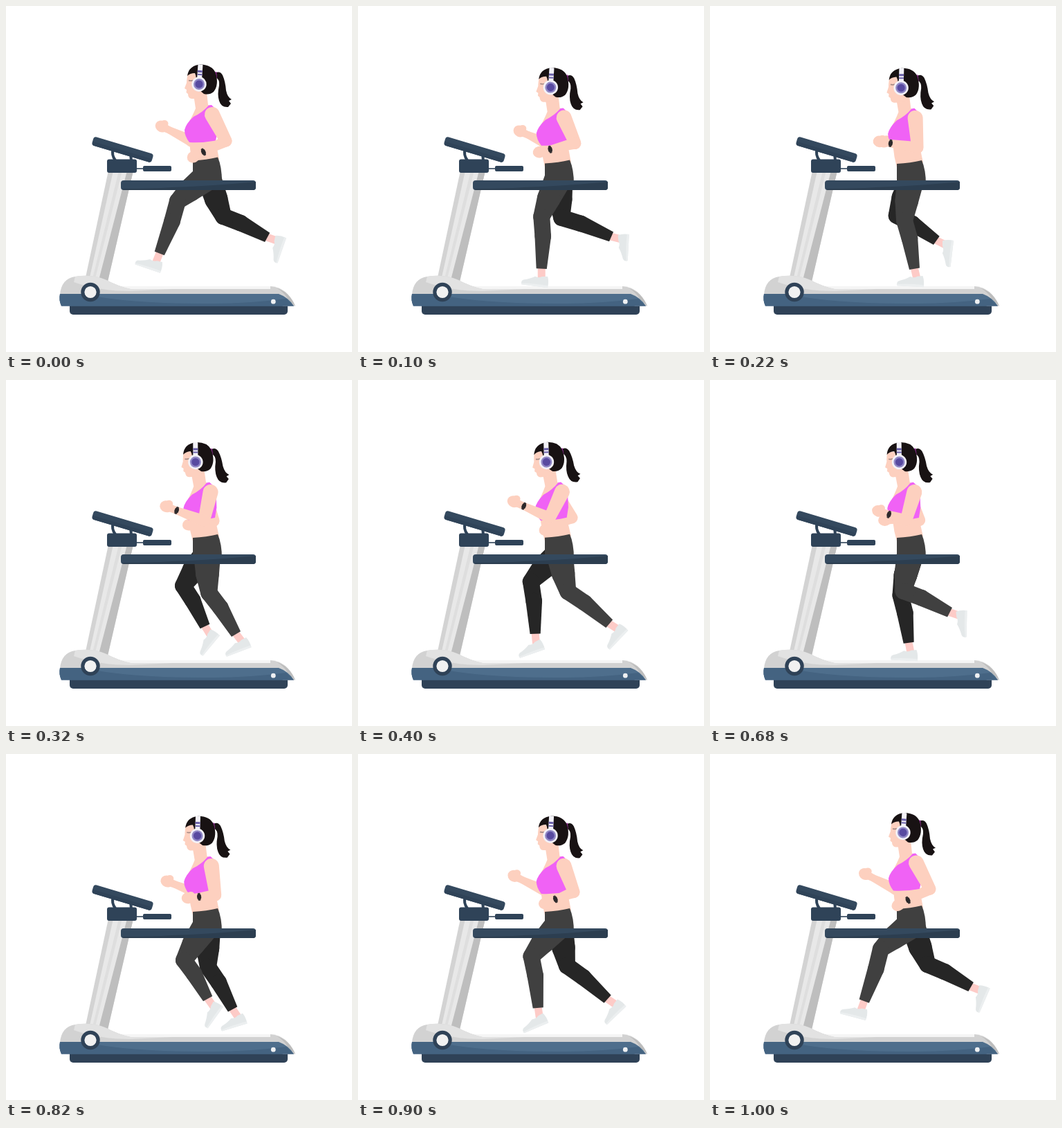
Recreate the animation shown at these times as an HTML page with a canvas. Size 500 by 500 pixels, loop 1020 ms.

```html
<!DOCTYPE html>
<html lang="en">
<head>
<meta charset="utf-8">
<title>Treadmill run</title>
<style>
html, body { margin: 0; width: 100%; height: 100%; overflow: hidden; background: #fff; }
canvas { display: block; width: 500px; height: 500px; }
</style>
</head>
<body>
<canvas id="stage" width="500" height="500"></canvas>
<script>
const ctx = document.getElementById('stage').getContext('2d');
const LOOP = 1020, STEP = 20, TAU = 2 * Math.PI, RAD = Math.PI / 180;
const SKIN = '#fdd0bf', ANKLE = '#fdcbc7', PINK = '#f062f5', HAIR = '#181213';
const NAVY = '#2f4358', SLATE = '#34495e', SHOE = '#e4e8e9';
const NEAR = '#404040', FAR = '#262626';
const FLOOR = 379; // lowest trouser end while the sole is on the belt

// One stride in evenly spaced poses: knee x y, trouser end x y.
const stride = [
  [248, 282, 222, 357],
  [270, 309, 277, 388],
  [285, 309, 304, 377],
  [301, 306, 358, 355],
  [314, 304, 377, 334],
  [288, 306, 359, 334],
  [264, 301, 313, 342],
  [251, 293, 263, 366]
];

// Closed Catmull-Rom curve through the poses; phase runs from 0 to 1.
function pose(phase) {
  const n = stride.length, i = Math.floor(phase * n), u = phase * n - i;
  const [a, b, c, d] = [-1, 0, 1, 2].map(k => stride[(i + k + n) % n]);
  return b.map((p, k) => p + u / 2 * (c[k] - a[k]
    + u * (2 * a[k] - 5 * p + 4 * c[k] - d[k] + u * (3 * (p - c[k]) + d[k] - a[k]))));
}

function fill(color, d) {
  ctx.fillStyle = color;
  ctx.fill(new Path2D(d));
}
function disc(color, x, y, rx, ry = rx, turn = 0) {
  ctx.fillStyle = color;
  ctx.beginPath();
  ctx.ellipse(x, y, rx, ry, turn, 0, TAU);
  ctx.fill();
}
function box(color, x, y, w, h, r) {
  ctx.fillStyle = color;
  ctx.beginPath();
  ctx.roundRect(x, y, w, h, r);
  ctx.fill();
}
function stroke(color, width, d) {
  ctx.strokeStyle = color;
  ctx.lineWidth = width;
  ctx.stroke(new Path2D(d));
}
function placed(x, y, turn, draw) {
  ctx.save();
  ctx.translate(x, y);
  ctx.rotate(turn);
  draw();
  ctx.restore();
}
function turned(x, y, turn, draw) {
  placed(x, y, turn, () => {
    ctx.translate(-x, -y);
    draw();
  });
}
// Tapered limb; a flat one is cut straight at its second end.
function limb(color, x1, y1, r1, x2, y2, r2, flat) {
  const a = Math.atan2(y2 - y1, x2 - x1);
  const b = Math.acos(Math.max(-1, Math.min(1, (r1 - r2) / Math.hypot(x2 - x1, y2 - y1))));
  ctx.fillStyle = color;
  ctx.beginPath();
  ctx.arc(x1, y1, r1, a + b, a - b + TAU);
  if (flat) {
    ctx.lineTo(x2 + r2 * Math.cos(a - b), y2 + r2 * Math.sin(a - b));
    ctx.lineTo(x2 + r2 * Math.cos(a + b), y2 + r2 * Math.sin(a + b));
  } else {
    ctx.arc(x2, y2, r2, a - b, a + b);
  }
  ctx.fill();
}
// Limb with a muscle: a wider spot part way along, pushed to one side.
function muscle(color, x1, y1, r1, x2, y2, r2, at, r, side, flat) {
  const dx = x2 - x1, dy = y2 - y1, len = Math.hypot(dx, dy);
  const mx = x1 + dx * at + dy / len * side, my = y1 + dy * at - dx / len * side;
  limb(color, x1, y1, r1, mx, my, r);
  limb(color, mx, my, r, x2, y2, r2, flat);
}

function leg(color, hipX, hipR, phase) {
  const [kx, ky, ex, low] = pose(phase);
  const ey = Math.min(low, FLOOR);
  const tilt = Math.atan2(ex - kx, ey - ky);
  const fx = ex + 18 * Math.sin(tilt), fy = ey + 18 * Math.cos(tilt);
  // the foot follows the shin, flexing flat in stance and trailing in the swing
  const flex = 18 * Math.sin(TAU * (phase - .03));
  limb(ANKLE, ex, ey, 5.5, fx, fy - 2, 5.5);
  placed(fx, fy, -1.15 * tilt + flex * RAD, () => {
    fill(SHOE, 'M-10-5Q-4-3 0-6L8-7Q11 0 10 9H-28Q-30 4-26 2Q-16-1-10-5Z');
    fill('#eceff0', 'M-29 7Q-8 5 10 6V9H-28Z');
  });
  muscle(color, hipX, 247, hipR, kx, ky, 12, .55, 16.8, -1);
  muscle(color, kx, ky, 12, ex, ey, 7.6, .38, 11.8, 2, true);
}

function arm(sx, sy, phase, shift, watch) {
  const c = Math.cos(TAU * phase), s = Math.sin(TAU * phase);
  const ex = 295 + 23 * c + shift, ey = 195 + 10 * s * s;
  const hx = 248 + 23 * c - 8 * s, hy = 196 + 22 * c - 5 * s;
  const a = Math.atan2(hy - ey, hx - ex), ca = Math.cos(a), sa = Math.sin(a);
  const wx = hx - 13 * ca, wy = hy - 13 * sa;
  limb(SKIN, sx, sy, 11, ex, ey, 8.6);
  limb(SKIN, ex, ey, 8.3, wx, wy, 5.2);
  limb(SKIN, wx, wy, 5.2, hx, hy, 6);
  disc(SKIN, hx, hy, 9.5, 8.3, a);
  disc(SKIN, hx + 4, hy - 4, 5.5, 5);
  if (watch) placed(hx - 16 * ca, hy - 16 * sa, a, () => {
    box('#3a3436', -2, -5.5, 4, 11, 1.5);
    box('#2c292b', -3, -3.5, 6, 7, 2);
  });
}

function treadmill() {
  // post
  fill('#d3d3d3', 'M148 238H184L147 398L115 392Z');
  fill('#e8e8e8', 'M155 238H176L136 396L121 392Z');
  fill('#dedede', 'M163 238H168L129 394H125Z');
  fill('#bebebe', 'M175 238H184L147 398L134 396Z');
  // console
  stroke(NAVY, 4, 'M155 207Q152 215 158 223M180 214L181 223');
  placed(168.5, 207.5, 16.5 * RAD, () => {
    box(SLATE, -45, -6.5, 90, 13, 4);
    box(NAVY, -44, 1, 88, 5.5, 3);
  });
  box(NAVY, 146, 221.5, 43, 19.5, 3);
  stroke(NAVY, 1.6, 'M188 235H200');
  box(NAVY, 198, 231, 41, 8, 2);
  // base
  box('#2f4257', 92, 428, 315, 18, 5);
  fill('#f5f5f5', 'M160 405H390V411H160Z');
  fill('#d2d2d2', 'M78 417Q80 394 100 391Q125 387 145 396Q162 405 180 409H392V417Z');
  fill('#e2e2e2', 'M100 391Q125 387 145 396Q162 405 180 409H240L180 412Q135 412 98 399Z');
  fill('#d2d2d2', 'M382 405Q406 406 418 433.5H400L382 417Z');
  fill('#bdbdbd', 'M392 408Q410 414 418 433.5L408 424Q402 414 392 408Z');
  fill('#4e6e8c', 'M78 416H394Q408 421 416 433.5H80Q76 425 78 416Z');
  fill('#446381', 'M78 416H110Q180 431 300 430Q350 430 405 423L416 433.5H80Q76 425 78 416Z');
  disc('#2f4257', 122, 413.5, 13.7);
  disc('#f1f1f1', 122, 413.5, 8.6);
  disc('#eef0f2', 386.3, 427.2, 3.4);
}

function rail() {
  box(SLATE, 166, 252, 195, 14, 4);
  fill('#2c3e50', 'M168 264Q210 264 240 262Q300 260 361 254V262Q361 266 357 266H170Z');
}

function torso() {
  fill(SKIN, 'M271 128L274 148Q270 158 262 172L265 197Q266 213 270 228L308 222L303 195L305 160Q305 148 292 143L290 124Z');
  fill(PINK, 'M293 143.5L297 143L306 152V180L303 194.5Q284 198 265 197Q258 188 258 179Q260 170 271 160Q284 154 293 143.5Z');
}

function head() {
  fill(HAIR, 'M302 97Q309 93 313 100Q317 109 318 122Q320 132 326 135L322 137L325 141L321 146Q311 147 308 137Q305 128 308 115Q309 106 303 103Z');
  fill('#9c2fa0', 'M300 96L304 95L305 104L301 105Z');
  fill(SKIN, 'M263 97Q261 106 261 111L258 119L261 121L260.5 125L263 127Q263 133 268 134L275 134L290 133V98Z');
  fill(HAIR, 'M262 101Q264 86 281 84.5Q298 85 303 97Q308 114 300 124Q294 129 286 127Q278 121 274 112Q276 103 273 97Q266 97 262 101Z');
  stroke('#a58a85', 1.7, 'M264 107.5Q267 108.5 270.5 107.5');
  placed(279, 113, 4 * RAD, () => {
    box('#f3f2f8', -3.5, -28.5, 7, 20, 1);
    box('#6b61aa', -3.5, -20, 7, 3, 0);
    box('#6b61aa', -3.5, -15, 7, 2, 0);
    disc('#f3f2f8', 0, 0, 10.7);
    disc('#8f87c6', 0, 0, 8);
    disc('#584aa0', 0, 0, 5.6);
  });
}

function scene(phase) {
  const c = Math.cos(TAU * phase), other = (phase + .5) % 1;
  const drop = 5 * (1 - c ** 12);
  const tilt = -1.55 * (1 - c) * RAD;
  const leaned = draw => turned(290, 222, tilt, draw);

  ctx.fillStyle = '#fff';
  ctx.fillRect(0, 0, 500, 500);
  treadmill();
  leg(FAR, 293, 17.5, other);
  // shoulders slide forward as the body leans
  arm(288 + 62 * tilt, 160 + drop, other, -4, false);
  placed(0, drop, 0, () => leaned(torso));
  leg(NEAR, 290.5, 20, phase);
  placed(0, drop * .9, 0, () =>
    fill(NEAR, 'M270 223.5Q290 222.5 306 218.5Q312 232 312 254H270Z'));
  arm(298 + 65 * tilt, 157 + drop, phase, 0, true);
  placed(0, drop, 0, () => leaned(() => turned(278, 140, tilt, head)));
  rail();
}

const start = performance.now();
function tick() {
  const t = (performance.now() - start) % LOOP;
  scene(Math.floor(t / STEP) * STEP / LOOP);
  requestAnimationFrame(tick);
}
tick();
</script>
</body>
</html>
```
